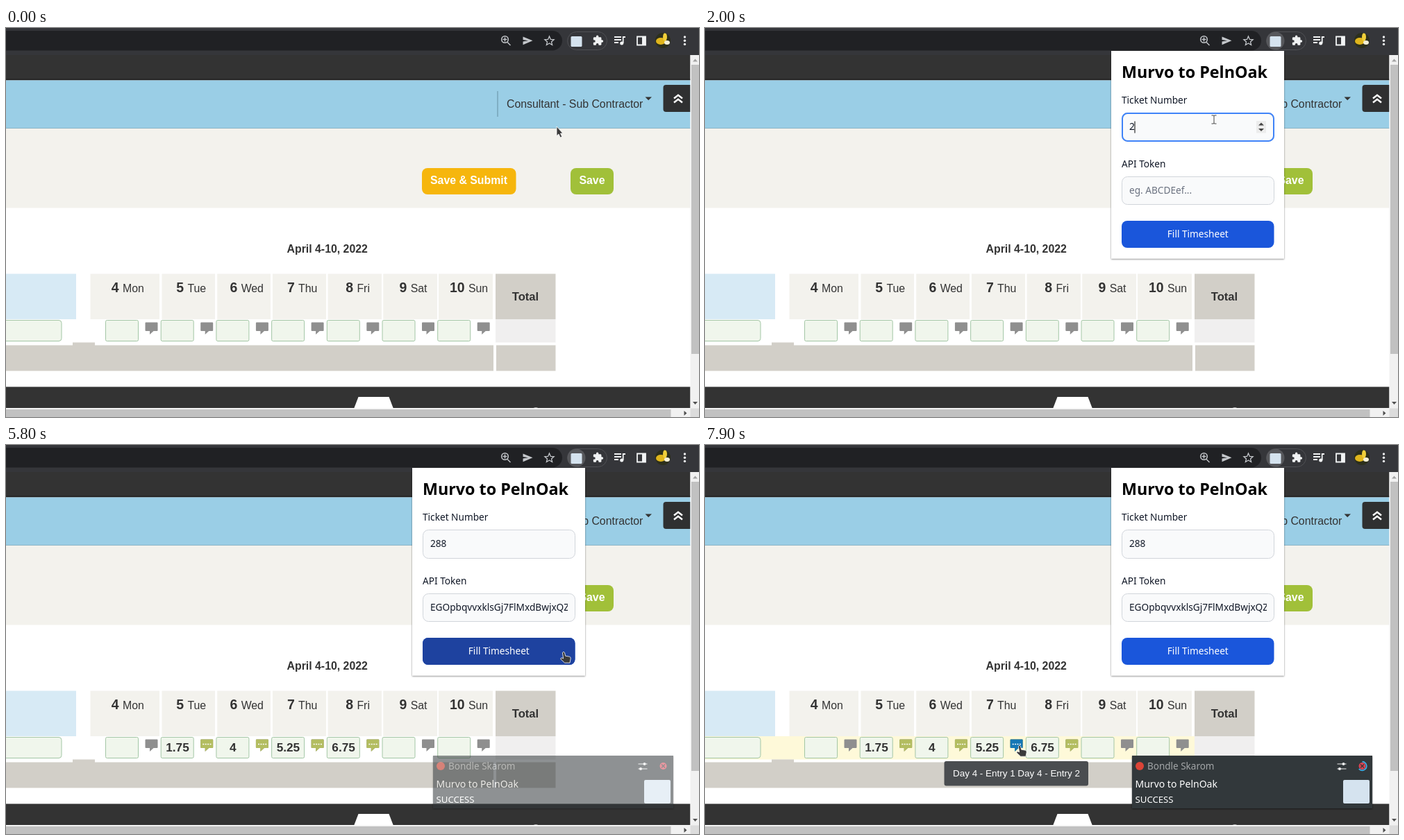
Animation, 998 px wide and 561 px high, one loop 8000 ms. Source, as an HTML page:

```html
<!DOCTYPE html>
<html lang="en">
<head>
<meta charset="utf-8">
<title>Timesheet fill</title>
<style>
  @property --t { syntax: '<number>'; inherits: true; initial-value: 0; }
  :root { animation: clock 8s steps(80) infinite; }
  html, body { margin: 0; width: 100%; height: 100%; overflow: hidden; background: #fff; }
  svg { display: block; width: 998px; height: 561px; }
  text { font: 15.85px 'Liberation Sans', Arial, sans-serif; fill: #333; white-space: pre; }
  .b { font-weight: bold; }
  .mid { text-anchor: middle; }
  .end { text-anchor: end; }
  .white { fill: #fff; }
  .big { font-size: 19.4px; font-weight: bold; }
  .ui text { font: 13.65px 'Noto Sans', sans-serif; fill: #111827; }
  .ui .title { font-size: 23.3px; font-weight: bold; fill: #000; }
  .ui .hint { fill: #6b7280; }
  .ui .white, .note text { fill: #fff; }
  .field { fill: #f9fafb; stroke: #d1d5db; }
  .focus { fill: #f9fafb; stroke: #3f83f8; stroke-width: 2; }
  .cell { fill: #f0f6ec; stroke: #a3c6a5; }

  /* visible from --a until --b, in ms */
  .on { --a: 0; --b: 9000; opacity: min(var(--t) - var(--a) + 1, var(--b) - var(--t)); }

  #popup { animation: popup 8s step-end infinite; }
  #notice { animation: notice 8s step-end infinite; }
  #pointer { animation: pointer 8s infinite; }
  #ring { stroke-dasharray: 100 100; stroke-dashoffset: calc((var(--t) - 5900) / 55 * 1px); }

  @keyframes clock { to { --t: 8000; } }
  @keyframes popup {
    0% { opacity: 0; transform: translateY(-3px); }
    12.5% { opacity: .08; transform: translateY(-3px); }
    13.75% { opacity: .4; transform: translateY(-2px); }
    15% { opacity: .75; transform: translateY(-1px); }
    16.25%, 100% { opacity: 1; transform: none; }
  }
  @keyframes notice {
    0% { opacity: 0; }
    71.25% { opacity: .25; }
    72.5% { opacity: .55; }
    73.75% { opacity: .8; }
    75%, 100% { opacity: 1; }
  }
  @keyframes pointer {
    0% { transform: translate(793px, 142px); animation-timing-function: steps(8); }
    10% { transform: translate(820px, 22px); animation-timing-function: steps(2); }
    12.5% { transform: translate(813px, 31px); animation-timing-function: steps(6); }
    20% { transform: translate(733px, 132px); animation-timing-function: step-end; }
    30% { transform: translate(724px, 148px); animation-timing-function: step-end; }
    33.75% { transform: translate(724px, 148px); animation-timing-function: steps(4); }
    38.75% { transform: translate(716px, 236px); animation-timing-function: step-end; }
    45% { transform: translate(716px, 236px); animation-timing-function: steps(3); }
    48.75% { transform: translate(843px, 320px); animation-timing-function: step-end; }
    50% { transform: translate(843px, 328px); animation-timing-function: steps(3); }
    53.75% { transform: translate(803px, 298px); animation-timing-function: step-end; }
    80% { transform: translate(803px, 298px); animation-timing-function: steps(7); }
    88.75% { transform: translate(389px, 420px); animation-timing-function: steps(2); }
    91.25% { transform: translate(418px, 455px); animation-timing-function: steps(2); }
    93.75%, 100% { transform: translate(453px, 433px); }
  }
</style>
</head>
<body>
<svg viewBox="0 0 998 561">
  <defs>
    <path id="arrow" d="M0 0V13.6L3 10.9 5.2 15.9 7.7 14.8 5.5 10H9Z" fill="#3a3a3a" stroke="#fff" stroke-width=".8"/>
    <path id="hand" d="M-1.6 1.4Q0-1 1.5 1.4L2.6 6.2 8.4 7.2Q10.6 7.8 10.2 10L9 16.2H1.6L-4.2 10.8Q-4.4 8.6-2.2 9L-.4 10Z" fill="#3a3a3a" stroke="#fff" stroke-width=".8"/>
    <path id="beam" d="M-3.5-6H-1Q0-6 0-5Q0-6 1-6H3.5M0-5V5M-3.5 6H-1Q0 6 0 5Q0 6 1 6H3.5" fill="none" stroke="#444"/>
    <path id="bubble" d="M201.5 424.5H217.5Q218.5 424.5 218.5 425.5V436Q218.5 437 217.5 437H212.5L207 442V437H201.5Q200.5 437 200.5 436V425.5Q200.5 424.5 201.5 424.5Z"/>
    <path id="dots" d="M203.6 431.5h2m1.4 0h2m1.4 0h2m1.4 0h2" stroke="#fff" stroke-width="1.6"/>
    <clipPath id="inner"><path d="M611 215h198v39h-198z"/></clipPath>
    <clipPath id="face"><circle cx="946" cy="18" r="11"/></clipPath>
    <clipPath id="view"><path d="M0 39h985.500v509H0z"/></clipPath>
    <filter id="shade" x="-5%" y="-5%" width="110%" height="110%">
      <feDropShadow dx="0" dy="1" stdDeviation="1.3" flood-opacity=".5"/>
    </filter>
  </defs>

  <!-- browser bar -->
  <path d="M0 0H998V39H0Z" fill="#35363a"/>
  <rect x="-40" y="4" width="841" height="28.500" rx="14.200" fill="#202124"/>
  <g fill="none" stroke="#c4c7cb" stroke-width="1.500">
    <path d="M722 20.500L726.500 25M715.500 16.500H721.500M718.500 13.500V19.500" stroke-width="1.400"/>
    <circle cx="718.500" cy="16.500" r="4.800"/>
    <path d="M782.500 12L784.400 16.400 789.100 16.800 785.500 19.900 786.600 24.500 782.500 22 778.400 24.500 779.500 19.900 775.900 16.800 780.600 16.400Z" stroke-width="1.300"/>
  </g>
  <path d="M744.500 12.500L758.500 18.300 744.500 24.200V19.600L752 18.300 744.500 17Z" fill="#c4c7cb"/>
  <rect x="808.500" y="5.500" width="57" height="26" rx="13" fill="none" stroke="#505155"/>
  <circle class="on" style="--a:800" cx="821.500" cy="18.500" r="13" fill="#57585c"/>
  <rect x="813.500" y="12" width="16" height="15" rx="1.500" fill="#d5e3ef"/>
  <path transform="translate(844.500 9.800) scale(.68)" fill="#f1f3f4" d="M20.500 11H19V7c0-1.100-.9-2-2-2h-4V3.500a2.500 2.500 0 0 0-5 0V5H4c-1.100 0-2 .9-2 2v3.800h1.500a2.700 2.700 0 0 1 0 5.400H2V20c0 1.100.9 2 2 2h3.800v-1.500a2.700 2.700 0 0 1 5.400 0V22H17c1.100 0 2-.9 2-2v-4h1.500a2.500 2.500 0 0 0 0-5z"/>
  <g fill="none" stroke="#f1f3f4" stroke-width="1.800">
    <path d="M876 13H886M876 17H886M876 21H882M888.700 22V13H892"/>
    <path d="M909 12.500H921V24.500H909Z"/>
  </g>
  <g fill="#f1f3f4">
    <circle cx="886.700" cy="22" r="2.500"/>
    <path d="M916 12H921V25H916Z"/>
    <circle cx="977.500" cy="13" r="1.700"/><circle cx="977.500" cy="18.200" r="1.700"/><circle cx="977.500" cy="23.400" r="1.700"/>
  </g>
  <g clip-path="url(#face)">
    <path d="M930 0H960V32H930Z" fill="#2c2f1c"/>
    <ellipse cx="943" cy="19" rx="7" ry="5" fill="#e0b51c"/>
    <ellipse cx="949" cy="13" rx="3" ry="6" fill="#f0cf3a"/>
    <ellipse cx="952" cy="21" rx="4" ry="3" fill="#f4f0d8"/>
  </g>

  <!-- page -->
  <g clip-path="url(#view)">
    <path d="M0 39H986V75H0Z" fill="#333"/>
    <path d="M0 73.500H986V75.500H0Z" fill="#222"/>
    <path d="M0 75.500H986V145H0Z" fill="#9acee6"/>
    <path d="M0 144H986V145H0Z" fill="#8bb4c6"/>
    <path d="M0 145H986V259.500H0Z" fill="#f3f2ed"/>
    <path class="on" style="--a:200;--b:500" d="M708 91H986V128H708Z" fill="#fff" fill-opacity=".15"/>
    <path d="M708 91V128" stroke="#6e9aae" stroke-width="1.200"/>
    <text x="721" y="115">Consultant - Sub Contractor</text>
    <path d="M920.500 99.500H930L925.200 104.300Z" fill="#333"/>
    <rect x="946.500" y="82" width="50" height="39" rx="4" fill="#2f3031"/>
    <path d="M962 101.500L968 96.800 974 101.500M962 107.500L968 102.800 974 107.500" fill="none" stroke="#fff" stroke-width="2.500"/>
    <rect x="599" y="202" width="135.500" height="38" rx="8" fill="#f6b60d"/>
    <text class="b white mid" x="666.500" y="225.300">Save &amp; Submit</text>
    <rect x="813" y="202" width="62" height="38" rx="8" fill="#a1c039"/>
    <text class="b white mid" x="844" y="225.300">Save</text>
    <text class="b mid" x="462.700" y="323.500">April 4-10, 2022</text>

    <path d="M0 354.500H101V420H0Z" fill="#d7eaf5"/>
    <path class="on" style="--a:7200" d="M0 420H705V453.500H0Z" fill="#fef9d9"/>
    <rect class="cell" x="-20" y="421.500" width="100" height="30" rx="4"/>
    <path d="M705 354.500H791.500V420H705ZM0 457.500H702V494.500H0ZM706 457.500H791.500V494.500H706ZM96 453.500H128V458H96Z" fill="#d2cfc8"/>
    <path d="M705 420H791.500V453.500H705Z" fill="#f0efef"/>
    <text class="b mid" x="748" y="392.500" style="font-size:16.600px">Total</text>
    <g id="days"></g>

    <path d="M0 517.500H986V549H0Z" fill="#333"/>
    <path d="M507.500 532H551.500L558 549H501Z" fill="#fff"/>
    <circle cx="763" cy="553" r="6" fill="#aaa"/>
  </g>

  <!-- scrollbars -->
  <path d="M985.500 39H998V561H0V548.500H985.500Z" fill="#f1f1f1"/>
  <path d="M987 53H998V470H987ZM0 550H957.500V561H0Z" fill="#c1c1c1"/>
  <path d="M985.500 548.500H998V561H985.500Z" fill="#dcdcdc"/>
  <path d="M989 48.500H996L992.500 44.500Z" fill="#a3a3a3"/>
  <path d="M989 539H996L992.500 543ZM976.500 552V559L980.500 555.500Z" fill="#505050"/>

  <!-- extension popup -->
  <g id="popup" class="ui">
    <path d="M585 33H834V332.500H585Z" fill="#fff" filter="url(#shade)"/>
    <text class="title" x="600" y="72.300">Murvo to PelnOak</text>
    <text x="600" y="109">Ticket Number</text>
    <rect class="field" x="600.500" y="122.500" width="219" height="41" rx="8"/>
    <g class="on" style="--a:1600;--b:3000">
      <rect class="focus" x="601" y="123" width="218" height="40" rx="7.500"/>
      <path d="M794 134H808V151.500H794Z" fill="#ececec"/>
      <path d="M797 140.500H805L801 136.500ZM797 145H805L801 149Z" fill="#444"/>
    </g>
    <text class="hint on" style="--b:2000" x="611" y="147.300">eg. 123</text>
    <path class="on" style="--a:1600;--b:2000" d="M611 134.500h1v17h-1z"/>
    <g class="on" style="--a:2000;--b:2600">
      <text x="611" y="147.300">2</text><path d="M618.500 134.500h1v17h-1z"/>
    </g>
    <g class="on" style="--a:2600;--b:2700">
      <text x="611" y="147.300">28</text><path d="M626.500 134.500h1v17h-1z"/>
    </g>
    <text class="on" style="--a:2700" x="611" y="147.300">288</text>
    <path class="on" style="--a:2700;--b:3000" d="M634.500 134.500h1v17h-1z"/>

    <text x="600" y="201">API Token</text>
    <rect class="field" x="600.500" y="214.500" width="219" height="40" rx="8"/>
    <rect class="focus on" style="--a:3000;--b:4900" x="601" y="215" width="218" height="39.500" rx="7.500"/>
    <text class="hint on" style="--b:3600" x="611" y="238.600">eg. ABCDEef...</text>
    <path class="on" style="--a:3000;--b:3600" d="M611 225.500h1v17h-1z"/>
    <g clip-path="url(#inner)">
      <g class="on" style="--a:3600;--b:4900">
        <text class="end" x="808" y="238.600">EGOpbqvvxklsGj7FlMxdBwjxQZepdK</text>
        <path d="M807.500 225.500h1v17h-1z"/>
      </g>
      <text class="on" style="--a:4900" x="611" y="238.600">EGOpbqvvxklsGj7FlMxdBwjxQZepdK</text>
    </g>

    <rect class="on" style="--a:4900;--b:5500" x="596" y="274" width="228" height="47" rx="12" fill="#a4cafe"/>
    <rect x="600" y="278" width="219.500" height="39" rx="8" fill="#1a56db"/>
    <rect class="on" style="--a:4200;--b:6600" x="600" y="278" width="219.500" height="39" rx="8" fill="#1e429f"/>
    <text class="white mid" x="709.800" y="302.300">Fill Timesheet</text>
  </g>

  <!-- notification -->
  <g id="notice" class="ui note">
    <path d="M615 448H961V524H615Z" fill="#33373a" filter="url(#shade)"/>
    <circle cx="626" cy="463" r="6" fill="#db4437"/>
    <text x="637" y="468.300" style="font-size:13.500px;fill:#a3a6a8">Bondle Skarom</text>
    <text x="619.500" y="494" style="font-size:14px">Murvo to PelnOak</text>
    <text x="619.500" y="515.500" style="font-size:13.200px">SUCCESS</text>
    <path d="M910.500 460H923.500M910.500 467H923.500" stroke="#eee"/>
    <circle cx="919.500" cy="460" r="2" fill="#eee"/><circle cx="914" cy="467" r="2" fill="#eee"/>
    <circle cx="946.500" cy="463" r="5" fill="#da4453"/>
    <path d="M944 460.500l5 5m0-5l-5 5" stroke="#33373a" stroke-width="1.300"/>
    <g class="on" style="--a:5900">
      <circle id="ring" cx="946.500" cy="463" r="6.300" pathLength="100" transform="rotate(-90 946.500 463)" fill="none" stroke="#3daee9" stroke-width="1.700"/>
    </g>
    <rect x="919" y="483" width="38" height="34" rx="2" fill="#d5e3ef"/>
  </g>

  <!-- tooltip -->
  <g class="on" style="--a:7500">
    <rect x="344.500" y="456" width="207.500" height="35.500" rx="3" fill="#4a4d50"/>
    <text class="white mid" x="448.500" y="478" style="font-size:13.450px">Day 4 - Entry 1 Day 4 - Entry 2</text>
  </g>

  <g id="pointer">
    <use href="#arrow" class="on" style="--b:1500"/>
    <use href="#beam" class="on" style="--a:1500;--b:3700"/>
    <use href="#arrow" class="on" style="--a:3700;--b:4200"/>
    <use href="#hand" class="on" style="--a:4200;--b:6600"/>
    <use href="#arrow" class="on" style="--a:6600;--b:7400"/>
    <use href="#hand" class="on" style="--a:7400"/>
  </g>
</svg>
<script>
  const names = ['Mon', 'Tue', 'Wed', 'Thu', 'Fri', 'Sat', 'Sun'];
  const hours = ['', '1.75', '4', '5.25', '6.75', '', ''];
  const step = 79.7;

  const bubble = (x, color, from, dots) =>
    `<g class="on" style="--a:${from}" transform="translate(${x} 0)">
      <use href="#bubble" fill="${color}"/>${dots ? '<use href="#dots"/>' : ''}</g>`;

  const day = (name, i) => {
    const x = i * step;
    const left = i ? 144.8 + x : 121.5;
    const center = i ? 186.8 + i * 79.95 : 175.3;
    const filled = hours[i] !== '';
    return `<path d="M${left} 354.500H${221 + i * 80}V420H${left}Z" fill="#f3f2ed"/>
      <text class="mid" x="${center}" y="381"><tspan class="big">${4 + i} </tspan>${name}</text>
      <rect class="cell" x="${143.5 + x}" y="421.500" width="47" height="30" rx="2"/>
      ${bubble(x, '#8f8f8f', 0, false)}
      ${filled ? bubble(x, '#b3bd60', 5600, true) : ''}
      ${name === 'Thu' ? bubble(x, '#1677b5', 7400, true) : ''}
      <text class="b mid on" style="--a:5600;font-size:17.200px" x="${167.3 + x}" y="442">${hours[i]}</text>`;
  };

  document.getElementById('days').innerHTML = names.map(day).join('');
</script>
</body>
</html>
```
